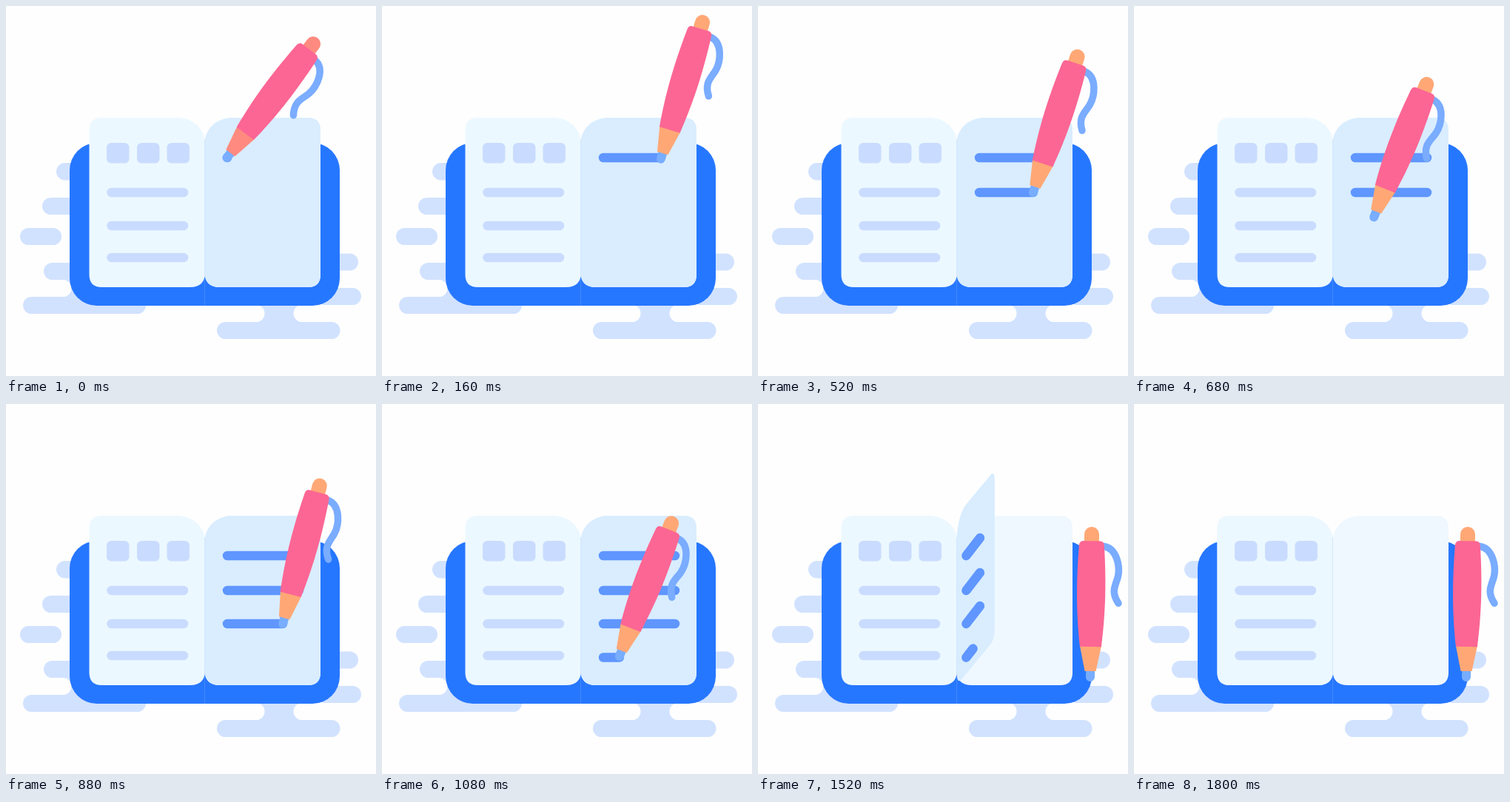
Animation, 500 px wide and 500 px high, one loop 2040 ms. Source, as an HTML page:

```html
<!DOCTYPE html>
<html lang="en">
<head>
<meta charset="utf-8">
<title>Notebook and pen</title>
<style>
  html, body { margin: 0; width: 100%; height: 100%; overflow: hidden; background: #fefefe; }
  svg { display: block; width: 100%; height: 100%; }
  .ink { fill: none; stroke-width: 12.5; stroke-linecap: round; }
</style>
</head>
<body>
<svg viewBox="0 0 500 500">
  <defs>
    <path id="page" d="M268.5 186C268.5 166 285 151 306 151H408Q425 151 425 168V363Q425 380 408 380H289Q268.5 380 268.5 360Z"/>
    <g id="left">
      <use href="#page" fill="#ecf8ff" transform="translate(537.5 0) scale(-1 1)"/>
      <g fill="#c9dcff">
        <rect x="136" y="185" width="30.5" height="27.5" rx="6"/>
        <rect x="177" y="185" width="30.5" height="27.5" rx="6"/>
        <rect x="217.500" y="185" width="30.5" height="27.5" rx="6"/>
      </g>
      <path class="ink" stroke="#c9dcff" d="M142.500 252H240M142.500 297H240M142.500 340H240"/>
    </g>
  </defs>

  <g fill="#d1e2ff">
    <rect x="68" y="212" width="60" height="23.500" rx="11.700"/>
    <rect x="49" y="259" width="70" height="23" rx="11.500"/>
    <rect x="19" y="300" width="56" height="23" rx="11.500"/>
    <rect x="51" y="347" width="70" height="23" rx="11.500"/>
    <rect x="23" y="393" width="166" height="23" rx="11.500"/>
    <path d="M77 370a11.500 11.500 0 0 1 0 23H110V370Z"/>
    <rect x="420" y="334.500" width="56" height="23" rx="11.500"/>
    <rect x="420" y="381" width="60" height="23" rx="11.500"/>
    <rect x="285" y="427" width="166.500" height="23" rx="11.500"/>
    <path d="M338 404a11.500 11.500 0 0 1 0 23H400a11.500 11.500 0 0 1 0-23Z"/>
  </g>

  <rect x="86" y="185" width="365" height="220" rx="37" fill="#2677ff"/>
  <path d="M268.500 365V405" stroke="#4a8dff" stroke-width=".8"/>
  <use href="#left"/>
  <use href="#page" fill="#f0f8ff"/>
  <g id="front">
    <use id="sheet" href="#page" fill="#d9edff"/>
    <path id="text" class="ink" stroke="#5f96ff"/>
  </g>
  <use id="back" href="#left"/>
  <path d="M268.500 180V366" stroke="#cfe3fb" stroke-width=".8"/>

  <g id="pen">
    <path d="M16-177C34-175 39-150 36-136C33-124 26-116 37-100" fill="none" stroke="#7aacff" stroke-width="9.500" stroke-linecap="round"/>
    <path d="M-6-10H6V0A6 6 0 0 1-6 0Z" fill="#78adff"/>
    <path id="trim" d="M-10-182V-193A10 10 0 0 1 10-193V-182ZM-14.500-42H14.500L7.500-8H-7.500Z"/>
    <path d="M-14.500-41C-19-80-21-120-17-178Q-16.500-184-11-184H11Q16.500-184 17-178C21-120 19-80 14.500-41Z" fill="#fc6694"/>
  </g>
</svg>
<script>
const LOOP = 2040, SPINE = 268.5, PAGE_W = 156.5;
const $ = id => document.getElementById(id);

// time, nib x, nib y, tilt in degrees
const poses = [
  [0, 298, 205, 37.3], [200, 396, 207, 12],
  [312, 299, 252, 36.2], [590, 396, 252, 12],
  [713, 299, 297, 25], [930, 396, 297, 12],
  [1040, 299, 341, 25], [1130, 347, 341, 17],
  [1260, 449, 369, 0.6], [LOOP, 449, 369, 0.6]
];
// start time, end time, y, right end
const lines = [[0, 200, 205, 396], [312, 590, 252, 396], [713, 930, 297, 396], [1040, 1130, 342.5, 347]];

function poseAt(t) {
  const i = poses.findIndex(p => p[0] > t);
  const a = poses[i - 1], b = poses[i];
  const k = (t - a[0]) / (b[0] - a[0]);
  return a.map((v, j) => v + (b[j] - v) * k);
}

// Squeeze the page towards the spine and lift its outer edge.
function fold(scale, lift) {
  return `matrix(${scale} ${-lift / PAGE_W} 0 1 ${SPINE * (1 - scale)} ${SPINE * lift / PAGE_W})`;
}

function show(el, on) { el.style.display = on ? "" : "none"; }

function draw(now) {
  const t = now % LOOP;
  const [, x, y, tilt] = poseAt(t);
  $("pen").setAttribute("transform", `translate(${x} ${y}) rotate(${tilt})`);
  $("trim").setAttribute("fill", t < 40 ? "#ff8b80" : "#ffa876");

  const turn = Math.PI * Math.min(1, Math.max(0, (t - 1340) / 460));
  const width = Math.cos(turn), lift = Math.min(62, 66 * Math.sin(turn));
  show($("front"), width > 0);
  show($("back"), width < 0);
  $("sheet").setAttribute("transform", fold(width, lift));
  $("back").setAttribute("transform", fold(-width, -lift));

  const squeeze = (width - 0.17) / 0.83;
  const left = SPINE + 30.5 * (0.14 + 0.86 * width);
  let d = "";
  for (const [from, to, ly, end] of lines) {
    if (t <= from || squeeze <= 0) continue;
    const len = (t < to ? Math.max(x, 299.1) : end) - 299;
    d += `M${left} ${ly}l${len * squeeze} ${-len * lift / 250}`;
  }
  $("text").setAttribute("d", d);
}

const start = performance.now();
function tick() {
  draw(performance.now() - start);
  requestAnimationFrame(tick);
}
tick();
</script>
</body>
</html>
```
